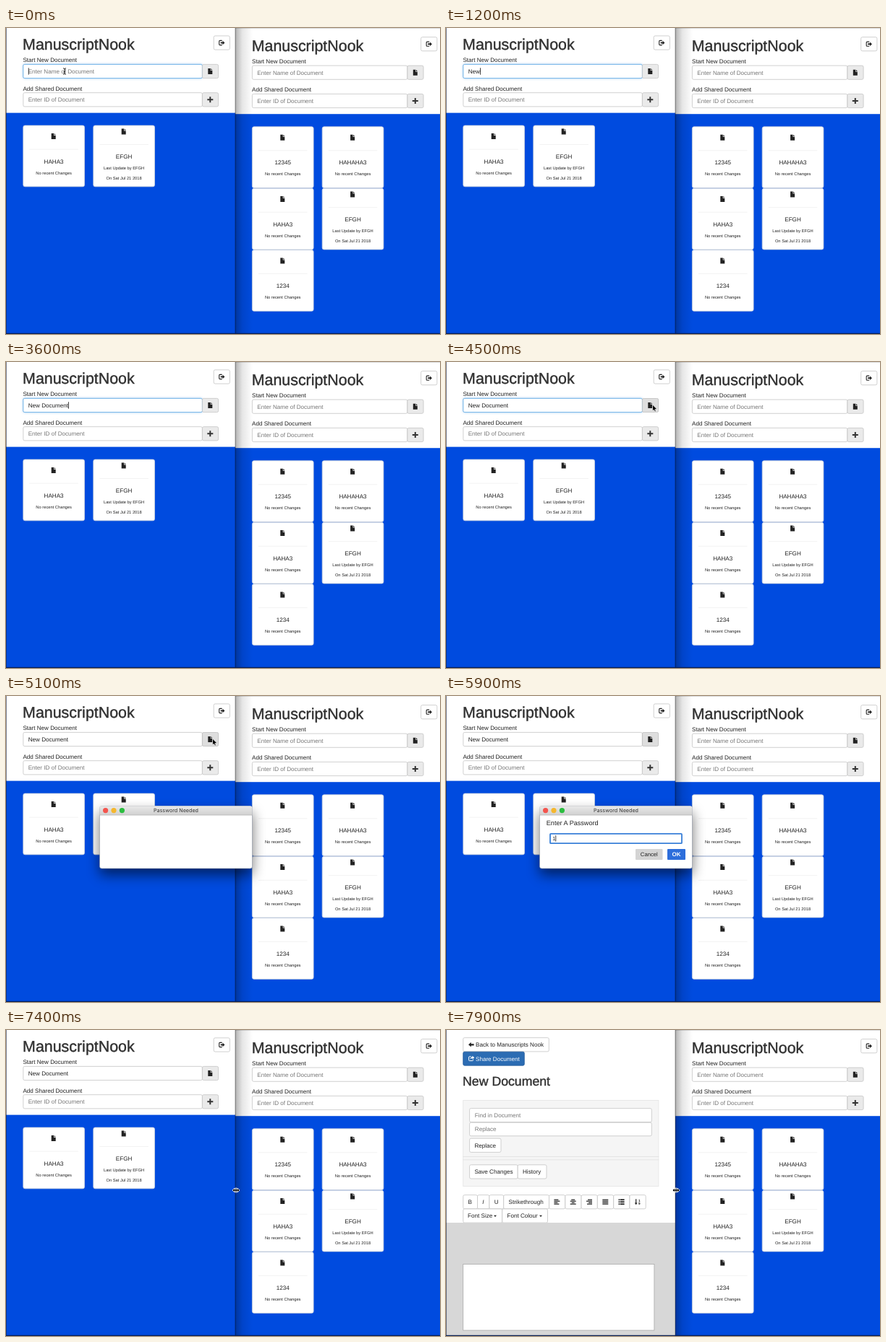
Animation of 600x424 px, one loop 8000 ms. Source, as an HTML page:

```html
<!DOCTYPE html>
<html lang="en">
<head>
<meta charset="utf-8">
<title>Shared documents</title>
<style>
  html, body { margin: 0; width: 100%; height: 100%; overflow: hidden; background: #fff; }
  svg { display: block; width: 600px; height: 424px; }
  text {
    font-family: "Liberation Sans", Arial, sans-serif; font-size: 8.1px; fill: #222;
    white-space: pre; text-rendering: geometricPrecision;
  }
  .head { fill: #303030; stroke: #303030; stroke-width: .4px; }
  .hint { fill: #777; }
  .small { font-size: 5.75px; }
  .mid { text-anchor: middle; }
  .bar { font-family: Inter, "Open Sans", sans-serif; font-size: 7.2px; fill: #333; }
</style>
</head>
<body>
<svg id="stage" viewBox="0 0 600 424" xmlns="http://www.w3.org/2000/svg"></svg>
<script>
const BLUE = '#004bdf', LOOP = 8000, TICK = 100;
const APP = 'ManuscriptNook', USER = 'EFGH';

const rect = (x, y, w, h, fill, extra = '') =>
  `<rect x="${x}" y="${y}" width="${w}" height="${h}" fill="${fill}" ${extra}/>`;
const box = (x, y, w, h, fill = '#fff', line = '#c4c4c4', r = 2) =>
  rect(x + .4, y + .4, w - .8, h - .8, fill, `stroke="${line}" stroke-width=".8" rx="${r}"`);
const text = (x, y, s, cls = '', extra = '') =>
  `<text x="${x}" y="${y}" class="${cls}" ${extra}>${s}</text>`;
const path = (d, extra = '') => `<path d="${d}" ${extra}/>`;
const at = (x, y, s) => `<g transform="translate(${x} ${y})">${s}</g>`;
const group = (id, s) => `<g id="${id}">${s}</g>`;
const line = (x, y, w, color = '#eaeaea') => rect(x, y, w, .8, color);

const icon = {
  file: path('M-3-4H.4V-1H3V4H-3ZM1.1-4L3-1.8H1.1Z', 'fill="#222"'),
  plus: path('M-1-4H1V-1H4V1H1V4H-1V1H-4V-1H-1Z', 'fill="#333"'),
  exit: path('M.4-3.1H-2.6Q-3.6-3.1-3.6-2.1V2.1Q-3.6 3.1-2.6 3.1H.4', 'fill="none" stroke="#222" stroke-width="1.1"')
      + path('M-1.6-1H1.2V-2.8L4.2 0L1.2 2.8V1H-1.6Z', 'fill="#222"'),
  back: path('M-4 0L-.3-3.3V-1.1H3.6V1.1H-.3V3.3Z', 'fill="#222"'),
  share: path('M-.4-2.8H-2.6Q-3.4-2.8-3.4-2V2.2Q-3.4 3-2.6 3H1.6Q2.4 3 2.4 2.2V.9', 'fill="none" stroke="#fff" stroke-width="1"')
      + path('M-1.4 1.2Q-1.2-2.2 1.4-2.3V-3.8L4.2-1.4L1.4 .9V-.6Q-.4-.6-1.4 1.2Z', 'fill="#fff"'),
  drop: path('M-2-1H2L0 1.2Z', 'fill="#222"')
};

// Four text lines; side is 0 left, .5 centre, 1 right
const lines = (widths, side) => widths.map((w, i) =>
  rect(-4 + (8 - w) * side, -3.6 + i * 2, w, 1.2, '#222')).join('');
icon.left = lines([6, 8, 5, 7], 0);
icon.center = lines([5, 8, 4, 8], .5);
icon.right = lines([6, 8, 5, 7], 1);
icon.full = lines([8, 8, 8, 8], 0);
icon.list = [-3, 0, 3].map(y => rect(-4, y - .9, 1.8, 1.8, '#222') + rect(-1.6, y - .9, 5.6, 1.8, '#222')).join('');
icon.sort = path('M-2.8-4H-1.6V1.3H-.3L-2.2 4L-4.1 1.3H-2.8Z', 'fill="#222"')
  + text(1, -.4, '1', '', 'style="font-size:4.6px;font-weight:bold"')
  + text(1, 4, '9', '', 'style="font-size:4.6px;font-weight:bold"');

function card(x, y, name, changed) {
  const up = changed ? -6.5 : 0;
  const notes = changed ? [`Last Update by ${USER}`, 'On Sat Jul 21 2018'] : ['No recent Changes'];
  return at(x, y, box(0, 0, 85.5, 85.5, '#fff', '#cfd3dc', 2.5)
    + at(42.3, 15.3 + up, icon.file) + line(9, 33 + up, 67.5, '#efefef')
    + text(42.7, 53 + up, name, 'mid')
    + notes.map((s, i) => text(42.7, 68 + up + i * 13.8, s, 'mid small')).join(''));
}

function row(y, w, hint, mark, id) {
  return box(0, y, w + .8, 20, '#fff', '#c4c4c4')
    + (id ? group('glow', rect(.4, y + .4, w, 19.2, '#fff', 'rx="2" stroke="#66afe9" stroke-width="1" filter="url(#halo)"')
        + rect(.4, y + .4, w, 19.2, '#fff', 'rx="2" stroke="#66afe9" stroke-width=".9"')) : '')
    + `<g ${id ? 'id="add"' : ''}>${box(w, y, 23, 20, '#eaeaea', '#c4c4c4')}</g>`
    + at(w + 11.3, y + 10, mark)
    + text(7.3, y + 12.9, hint, 'hint', id ? `id="${id}"` : '');
}

function portal(x, y, w, exitX, id) {
  return at(x, y, text(-.3, 30, APP, 'head', 'style="font-size:21.4px"')
    + box(exitX, 10.5, 23, 20) + at(exitX + 11.5, 20.5, icon.exit)
    + text(0, 47.2, 'Start New Document') + row(50, w, 'Enter Name of Document', icon.file, id)
    + text(0, 86.8, 'Add Shared Document') + row(89.3, w, 'Enter ID of Document', icon.plus));
}

const button = (x, y, w, label, dx = 7.2, extra = '') =>
  box(x, y, w, 20) + text(x + dx, y + 12.9, label, '', extra);

function editor() {
  const marks = ['left', 'center', 'right', 'full', 'list', 'sort'];
  return rect(0, 0, 317, 424, '#fff')
    + button(23.3, 10.3, 119.4, 'Back to Manuscripts Nook', 17.7) + at(35, 20.3, icon.back)
    + box(23.3, 29.8, 85.4, 19.8, '#2b6cb3', '#245c9b') + at(35, 39.6, icon.share)
    + text(41, 42.7, 'Share Document', '', 'style="fill:#fff"')
    + text(23.1, 76.6, 'New Document', 'head', 'style="font-size:17.7px"')
    + box(23.3, 97, 271, 120, '#f5f5f5', '#e4e4e4', 0)
    + line(23.3, 175, 271, '#e0e0e0') + line(23.3, 179.5, 271, '#e0e0e0')
    + box(32.2, 108.2, 252.5, 19.8) + text(39.8, 121, 'Find in Document', 'hint')
    + box(32.2, 127.8, 252.5, 19.4) + text(39.8, 140.4, 'Replace', 'hint')
    + button(32.2, 149.8, 44.2, 'Replace')
    + button(32.2, 186.4, 67.4, 'Save Changes') + button(98.8, 186.4, 40.6, 'History')
    + button(23.3, 228.2, 20.6, 'B') + button(43.1, 228.2, 17.2, 'I', 7.2, 'font-style="italic"')
    + button(59.5, 228.2, 20.6, 'U') + button(79.3, 228.2, 63.6, 'Strikethrough')
    + marks.map((m, i) => box(142.1 + i * 22.3, 228.2, 23, 20) + at(153.4 + i * 22.3, 238.2, icon[m])).join('')
    + button(23.3, 247.5, 54.8, 'Font Size', 6.8) + at(68, 257.8, icon.drop)
    + button(77.3, 247.5, 63.6, 'Font Colour') + at(131, 257.8, icon.drop)
    + rect(0, 267, 317, 157, '#d7d7d7') + box(23.3, 324, 265, 92.5, '#fff', '#a9a9a9', 0);
}

function dialog() {
  const lights = ['#f4544d', '#f5b72e', '#2bbd40'];
  return rect(129.5, 152.5, 211, 86.5, '#000', 'rx="3" filter="url(#drop)" opacity=".55"')
    + rect(129.5, 152.5, 211, 86.5, '#fff', 'rx="3" stroke="#8a8f99" stroke-width=".5"')
    + path('M129.5 165V155.5Q129.5 152.5 132.5 152.5H337.5Q340.5 152.5 340.5 155.5V165Z', 'fill="url(#bar)"')
    + line(129.5, 164.6, 211, '#b4b4b4')
    + lights.map((c, i) => `<circle cx="${137.6 + i * 11.4}" cy="158.6" r="3.6" fill="${c}"/>`).join('')
    + text(235, 161.3, 'Password Needed', 'mid bar')
    + group('form', text(138.8, 179.3, 'Enter A Password', '', 'style="font-size:9.1px"')
      + rect(144, 190.8, 182, 13.4, '#fff', 'rx="1" stroke="#3a80d8" stroke-width="1.8"')
      + text(147.3, 200, '', '', 'id="pass" style="font-size:7.2px"')
      + rect(262, 212, 37.5, 15, '#d4d4d4', 'rx="1"') + text(280.8, 222.2, 'Cancel', 'mid', 'style="font-size:7.7px"')
      + rect(306, 212, 25, 15, '#2d6edb', 'rx="1"')
      + text(318.5, 222.2, 'OK', 'mid', 'style="font-size:8px;font-weight:bold;fill:#fff"'));
}

const cursors = group('beam', path('M-2-4.2Q0-4.2 0-3Q0-4.2 2-4.2M0-3V3M-2 4.2Q0 4.2 0 3Q0 4.2 2 4.2M-1 .8H1',
    'fill="none" stroke="#111" stroke-width=".9"'))
  + group('arrow', path('M0 0V9L2-.0L2 7.2L3.3 10L4.8 9.3L3.6 6.6H6.4Z'.replace('L2-.0', ''),
    'fill="#000" stroke="#fff" stroke-width=".7"'))
  + group('resize', path('M-5 0L-2-3V-1H-.9V-3H.9V-1H2V-3L5 0L2 3V1H.9V3H-.9V1H-2V3Z',
    'fill="#111" stroke="#fff" stroke-width=".8"'));

document.getElementById('stage').innerHTML = `<defs>
  <filter id="halo" x="-10%" y="-60%" width="120%" height="220%"><feGaussianBlur stdDeviation="1.4"/></filter>
  <filter id="drop" x="-20%" y="-30%" width="140%" height="190%"><feOffset dy="9"/><feGaussianBlur stdDeviation="9"/></filter>
  <linearGradient id="bar" x2="0" y2="1"><stop stop-color="#e9e9e9"/><stop offset="1" stop-color="#d0d0d0"/></linearGradient>
  <linearGradient id="shade"><stop stop-opacity=".3"/><stop offset=".4" stop-opacity=".1"/><stop offset="1" stop-opacity="0"/></linearGradient>
</defs>`
  + rect(317, 0, 283, 424, '#fff') + rect(317, 119.2, 283, 305, BLUE) + line(317, 0, 283, '#d0d0d0')
  + portal(340, 1.7, 214.5, 233.3)
  + card(340, 136.4, '12345') + card(436.8, 136.4, 'HAHAHA3')
  + card(340, 221.8, 'HAHA3') + card(436.8, 221.8, USER, true) + card(340, 307.2, '1234')
  + rect(317, 0, 24, 424, 'url(#shade)')
  + group('home', rect(0, 0, 317, 424, '#fff') + rect(0, 117.6, 317, 307, BLUE)
    + portal(23.4, 0, 247.6, 263.4, 'name')
    + card(23.4, 134.7, 'HAHA3') + card(120.4, 134.7, USER, true))
  + group('doc', editor())
  + rect(316.6, 0, .9, 424, '#000', 'opacity=".5"') + rect(0, 0, .8, 424, '#12203f', 'opacity=".7"')
  + rect(0, 422.8, 600, 1.2, '#0a1f52')
  + group('ask', dialog())
  + rect(0, 0, .8, 9, '#111', 'id="caret"') + group('mouse', cursors);

const $ = id => document.getElementById(id);
const show = (id, on) => $(id).setAttribute('display', on ? 'inline' : 'none');

const nameKeys = [1000, 1100, 1200, 1900, 2000, 2200, 2500, 2600, 2700, 2800, 2900, 3600];
const passKeys = [5800, 6000, 6300, 6500];
const blinkOn = (t, from) => Math.floor((t - from) / 500) % 2 === 0;
const typed = (keys, t) => keys.filter(k => k <= t).length;

// time, x, y
const moves = [[0, 81, 60], [3700, 81, 60], [4300, 285.5, 59], [6600, 285.5, 59],
  [6900, 314.3, 230.8], [7200, 318, 222], [LOOP, 318, 222]];

function mouseAt(t) {
  const i = moves.findIndex(m => m[0] > t);
  const [t0, x0, y0] = moves[i - 1], [t1, x1, y1] = moves[i];
  const p = (t - t0) / (t1 - t0), e = p * p * (3 - 2 * p);
  return [x0 + (x1 - x0) * e, y0 + (y1 - y0) * e];
}

function placeCaret(field, y, h, on) {
  show('caret', on);
  const own = field.textContent && !field.classList.contains('hint') ? field.getComputedTextLength() : 0;
  const left = field.id === 'name' ? 30.7 : 147.3;
  $('caret').setAttribute('x', left + own + .1);
  $('caret').setAttribute('y', y);
  $('caret').setAttribute('height', h);
}

function draw(t) {
  const n = typed(nameKeys, t), p = typed(passKeys, t);
  const focus = t < 4800, open = t >= 5000 && t < 7300, form = t >= 5300;
  const name = $('name'), pass = $('pass');

  name.textContent = n ? 'New Document'.slice(0, n) : 'Enter Name of Document';
  name.setAttribute('class', n ? '' : 'hint');
  pass.textContent = '1234'.slice(0, p);
  show('glow', focus);
  show('home', t < 7700);
  show('doc', t >= 7700);
  show('ask', open);
  show('form', form);

  if (focus) placeCaret(name, 55.3, 9.4, blinkOn(t, n ? nameKeys[n - 1] : -300));
  else placeCaret(pass, 193.2, 8.4, open && form && blinkOn(t, p ? passKeys[p - 1] : 5300));

  const [x, y] = mouseAt(t);
  const hidden = (t >= 1000 && t < 3700) || (t >= 5800 && t < 6600);
  const shape = t >= 7300 ? 'resize' : x < 271 ? 'beam' : 'arrow';
  $('mouse').setAttribute('transform', `translate(${x} ${y})`);
  ['beam', 'arrow', 'resize'].forEach(s => show(s, !hidden && s === shape));
  $('add').style.filter = shape === 'arrow' && t < 6600 ? 'brightness(.95)' : 'none';
}

function loop() {
  const t = performance.now() % LOOP;
  draw(Math.floor(t / TICK) * TICK);
  requestAnimationFrame(loop);
}
loop();
</script>
</body>
</html>
```
